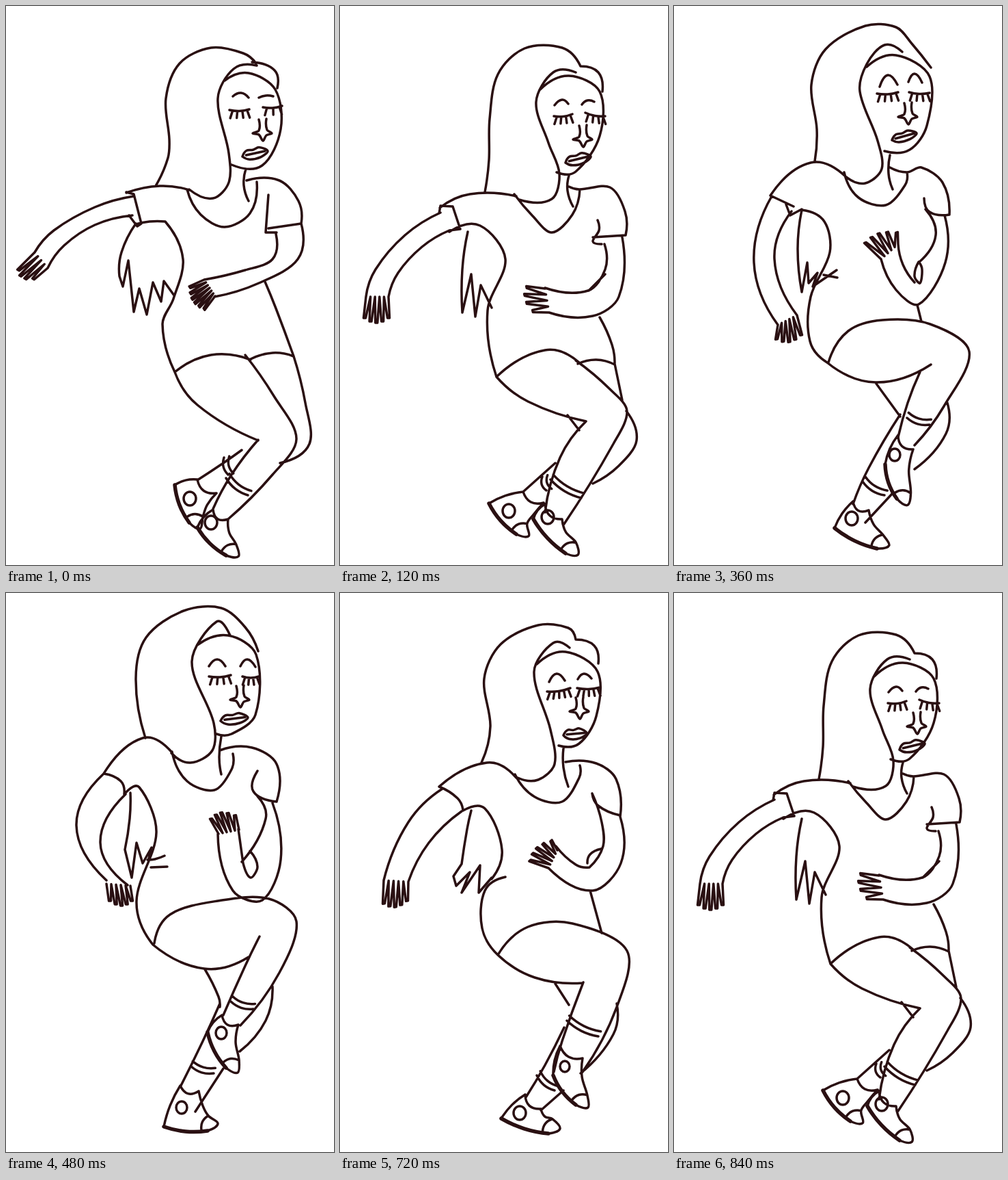
Animation, 480 px wide and 817 px high, one loop 0.96 s. Source, as an HTML page:

```html
<!DOCTYPE html>
<html lang="en">
<head>
<meta charset="utf-8">
<title>Running woman</title>
<style>
  html, body { margin: 0; width: 100%; height: 100%; overflow: hidden; background: #fff; }
  svg { display: block; width: 100%; height: 100%; }
  path { fill: none; stroke: #2a1012; stroke-linecap: round; stroke-linejoin: round; }
</style>
</head>
<body>
<svg viewBox="0 0 480 817">
  <path id="pen" stroke-width="3.5"/>
  <path id="marker" stroke-width="5.5"/>
</svg>
<script>
let ink, boldInk;

// Vector helpers
const add = (p, q, k = 1) => [p[0] + q[0] * k, p[1] + q[1] * k];
const sub = (p, q) => add(p, q, -1);
const mix = (p, q, t) => add(p, sub(q, p), t);
const unit = p => { const n = Math.hypot(...p); return [p[0] / n, p[1] / n]; };
const normal = (p, q) => { const [x, y] = unit(sub(q, p)); return [y, -x]; };
const pairs = xy => xy.reduce((all, v, i) => (i % 2 ? all[all.length - 1].push(v) : all.push([v]), all), []);

// Smooth path through all points, with tangents weighted by distance.
function spline(points) {
  const last = points.length - 1;
  const lengths = points.slice(1).map((p, i) => Math.hypot(...sub(p, points[i])));
  const slope = i => add([0, 0], sub(points[i + 1], points[i]), 1 / lengths[i]);
  const inner = i => add([0, 0], sub(points[i + 1], points[i - 1]), 1 / (lengths[i - 1] + lengths[i]));
  const tangent = i => {
    if (i > 0 && i < last) return inner(i);
    if (last === 1) return slope(0);
    return i === 0 ? sub(add(slope(0), slope(0)), inner(1))
                   : sub(add(slope(last - 1), slope(last - 1)), inner(last - 1));
  };
  let d = "M" + points[0];
  for (let i = 0; i < last; i++) {
    const k = lengths[i] / 3;
    d += `C${add(points[i], tangent(i), k)} ${add(points[i + 1], tangent(i + 1), -k)} ${points[i + 1]}`;
  }
  return d;
}

const polyline = points => "M" + points.join("L");
const curve = (...xy) => { ink += spline(pairs(xy)); };
const lines = (...xy) => { ink += polyline(pairs(xy)); };
const bow = (p, q, height) => spline([p, add(mix(p, q, 0.5), normal(p, q), height), q]);

// Closed lid with a fan of lashes below it
function eye(x0, y0, x1, y1, count) {
  const a = [x0, y0], b = [x1, y1];
  ink += bow(a, b, -2);
  for (let i = 0; i < count; i++) {
    const t = (i + 0.6) / count;
    const root = add(mix(a, b, t), [0, 2]);
    ink += polyline([root, add(root, [(t - 0.5) * 9, 10])]);
  }
}

function nose(x, y) {
  ink += spline([[x, y], [x, y + 16], [x - 9, y + 20], [x, y + 22], [x + 6, y + 31],
                 [x + 11, y + 23], [x + 19, y + 20], [x + 12, y + 15], [x + 11, y - 1]]);
}

function mouth(x0, y0, x1, y1, height) {
  const a = [x0, y0], b = [x1, y1], up = normal(a, b);
  const at = (t, k) => add(mix(a, b, t), up, k * height);
  ink += spline([a, at(0.2, 0.8), at(0.45, 0.7), at(0.7, 0.9), b, at(0.7, -0.7), at(0.25, -0.7), a]);
  ink += spline([at(0.15, 0.1), at(0.9, 0.1)]);
}

// Zigzag between a knuckle line and a rounded line of fingertips
function fingers(ax, ay, bx, by, cx, cy, dx, dy, count) {
  const a = [ax, ay], b = [bx, by], c = [cx, cy], d = [dx, dy];
  const outward = unit(sub(mix(c, d, 0.5), mix(a, b, 0.5)));
  const path = [a];
  for (let i = 0; i < count; i++) {
    const t = i / (count - 1);
    const side = add([0, 0], unit(sub(d, c)), 1.5);
    const tip = add(mix(c, d, t), outward, 7 * Math.sin(Math.PI * t));
    path.push(sub(tip, side), add(tip, side), mix(a, b, (i + 1) / count));
  }
  ink += polyline(path);
}

function sock(x0, y0, x1, y1) {
  const a = [x0, y0], b = [x1, y1], up = normal(a, b);
  ink += bow(a, b, -4) + bow(add(a, up, 8), add(b, up, 8), -4);
}

// Heel top, heel bottom, end of sole, instep, then the round badge
function shoe(hx, hy, bx, by, tx, ty, ix, iy, cx, cy, r) {
  const heel = [hx, hy], back = [bx, by], toe = [tx, ty], instep = [ix, iy];
  const along = unit(sub(toe, back)), up = normal(back, toe);
  const tip = add(add(toe, along, 14), up, 12);
  const cap = add(add(tip, along, -15), up, 10);
  ink += bow(heel, instep, -8) + bow(heel, back, -3);
  ink += spline([instep, add(mix(instep, cap, 0.45), up, -5), cap, tip, toe]);
  ink += bow(add(toe, along, -9), cap, 4);
  ink += `M${cx - r},${cy}a${r},${r + 1} 0 1 0 ${2 * r},0a${r},${r + 1} 0 1 0 ${-2 * r},0`;
  boldInk += bow(back, toe, -4);
}

function lunge() {
  // head
  curve(219,263, 237,222, 239,195, 234,135, 254,84, 300,61, 347,69, 366,84);
  curve(360,82, 393,94, 397,120);
  curve(367,87, 333,92, 310,135, 326,215, 326,258, 303,281, 268,268);
  curve(320,109, 355,98, 394,122, 402,180, 375,233, 330,232);
  curve(332,132, 344,127, 355,134);
  curve(370,134, 380,131, 391,132);
  eye(327,152, 356,151, 4);
  eye(376,148, 404,146, 3);
  nose(370,166);
  mouth(346,220, 383,212, 9);
  curve(351,238, 348,262, 355,285);
  // shirt
  curve(176,273, 225,263, 268,269);
  curve(265,268, 285,305, 320,323, 357,303, 367,257);
  curve(352,255, 400,255, 428,285, 432,318);
  lines(384,276, 380,331, 396,331);
  curve(384,325, 432,318);
  lines(176,272, 187,275, 198,318, 192,322, 180,306);
  curve(190,319, 210,315, 233,315);
  curve(233,315, 259,370, 245,428, 229,465, 247,535);
  curve(379,403, 395,442, 421,512);
  curve(247,535, 300,510, 358,517);
  curve(358,516, 390,507, 421,512);
  // hair behind the back
  curve(190,318, 169,360, 166,395);
  lines(166,395, 171,410, 179,372, 187,447, 195,413, 206,451, 215,404, 227,432, 231,402, 246,423);
  // arms
  curve(187,278, 130,294, 70,328, 42,360);
  curve(185,306, 130,320, 85,350, 61,383);
  fingers(42,360, 61,383, 18,386, 40,399, 4);
  curve(432,318, 427,370, 370,405, 305,425);
  curve(395,333, 390,370, 350,386, 290,400);
  fingers(290,400, 306,424, 269,411, 290,443, 6);
  // legs
  curve(247,535, 280,583, 369,635);
  curve(350,510, 392,570, 425,633, 390,685, 325,750);
  curve(369,634, 330,685, 303,735);
  curve(421,512, 438,580, 444,640, 401,668);
  curve(345,649, 318,668, 280,693);
  sock(322,690, 354,715);
  sock(319,660, 325,685);
  shoe(280,692, 247,700, 268,755, 308,712, 269,720, 9);
  shoe(303,736, 280,762, 322,803, 325,750, 300,755, 9);
}

function push() {
  // head
  curve(212,272, 218,225, 219,165, 231,100, 270,62, 325,61, 352,88);
  curve(352,88, 378,97, 384,125);
  curve(345,97, 312,97, 287,140, 305,200, 321,245, 310,282, 262,283);
  curve(293,122, 335,102, 380,125, 380,190, 345,242, 317,243);
  curve(314,145, 325,137, 334,143);
  curve(354,144, 362,138, 372,140);
  eye(313,161, 340,158, 4);
  eye(359,156, 388,161, 4);
  nose(350,175);
  mouth(330,229, 367,220, 9);
  curve(335,248, 333,270, 341,293);
  // shirt
  curve(146,295, 190,275, 258,278);
  curve(255,275, 282,307, 310,331, 340,305, 351,268);
  curve(335,264, 350,268, 395,265, 417,300, 418,335);
  curve(377,313, 379,328, 370,344, 383,348);
  curve(370,338, 418,335);
  lines(145,303, 147,292, 165,293, 176,326, 160,328);
  curve(160,330, 205,321, 242,370, 216,445, 229,542);
  curve(380,455, 398,495, 402,522);
  curve(229,542, 300,503, 350,521);
  curve(348,523, 375,517, 402,524);
  // hair behind the back
  curve(187,330, 179,385, 179,448);
  lines(179,448, 192,392, 198,454, 206,408, 222,441);
  // arms
  curve(147,302, 95,335, 52,385, 38,425);
  curve(160,328, 120,352, 85,390, 71,425);
  fingers(38,425, 71,425, 36,456, 71,456, 5);
  curve(413,338, 408,425, 370,453, 306,448);
  curve(387,348, 388,385, 363,416, 300,412);
  curve(388,392, 364,416);
  fingers(300,413, 306,448, 273,411, 282,446, 4);
  // legs
  curve(229,542, 275,578, 360,607);
  curve(345,518, 395,560, 420,592, 400,640, 328,757);
  curve(360,607, 322,660, 300,740);
  curve(402,523, 413,576);
  curve(419,592, 434,635, 408,672, 370,698);
  curve(333,598, 350,620);
  curve(315,668, 268,710);
  sock(308,692, 353,719);
  sock(296,688, 302,708);
  shoe(268,710, 218,727, 258,772, 298,726, 247,738, 9);
  shoe(300,728, 283,750, 330,800, 325,750, 304,747, 9);
}

function rise() {
  // head
  curve(207,248, 220,195, 211,125, 235,75, 290,47, 334,51, 345,68);
  curve(345,68, 372,77, 378,103);
  curve(336,80, 312,73, 284,115, 308,200, 314,250, 290,273, 260,270);
  curve(288,104, 330,86, 377,115, 375,180, 350,220, 320,223);
  curve(306,130, 317,118, 329,128);
  curve(348,126, 357,118, 368,125);
  eye(303,144, 337,139, 5);
  eye(347,139, 380,138, 5);
  nose(345,153);
  mouth(327,208, 361,205, 9);
  curve(327,227, 327,255, 334,283);
  // shirt
  curve(145,283, 215,248, 258,270);
  curve(256,265, 285,298, 325,305, 350,270, 351,252);
  curve(330,247, 375,249, 404,272, 410,327);
  curve(369,293, 378,311, 410,325);
  curve(369,293, 383,335, 385,370, 365,401);
  curve(145,283, 172,300, 180,317);
  curve(180,318, 212,315, 237,375, 222,418);
  curve(242,415, 212,435, 208,490, 231,529);
  curve(366,435, 383,497);
  // hair behind the back
  curve(192,318, 186,345, 178,396);
  lines(178,396, 166,414, 170,428, 190,408, 178,438, 205,398, 203,438, 222,416);
  // arms
  curve(150,286, 100,335, 64,420);
  curve(178,319, 130,365, 100,422);
  fingers(64,420, 100,422, 64,454, 98,450, 5);
  curve(410,327, 411,395, 370,435, 305,402);
  curve(316,370, 345,397, 365,401);
  curve(362,395, 366,382, 382,374);
  fingers(318,376, 305,402, 309,362, 278,391, 5);
  // legs
  curve(231,529, 275,488, 340,483, 420,523, 405,605, 355,700);
  curve(231,529, 285,562, 355,570);
  curve(356,569, 325,655, 313,700);
  curve(315,571, 335,602);
  curve(405,600, 400,645, 352,702);
  curve(328,635, 300,690, 272,737);
  curve(327,727, 294,756);
  sock(332,625, 378,648);
  sock(288,705, 314,727);
  shoe(322,662, 312,705, 345,748, 355,680, 329,692, 7);
  shoe(271,733, 236,768, 305,790, 294,754, 263,760, 9);
}

function lift() {
  // head
  curve(206,227, 209,180, 201,115, 222,63, 280,29, 325,31, 348,55, 376,90);
  curve(334,67, 308,57, 282,85, 272,125, 298,197, 304,238, 280,259, 252,250);
  curve(282,89, 325,72, 374,103, 370,175, 345,210, 308,212);
  curve(301,118, 313,101, 327,115);
  curve(343,111, 352,99, 363,112);
  eye(297,128, 328,126, 4);
  eye(344,126, 374,127, 4);
  nose(337,142);
  mouth(319,196, 355,186, 8);
  curve(316,218, 314,245, 320,268);
  // shirt
  curve(141,277, 200,229, 252,250);
  curve(249,243, 270,280, 310,291, 338,262, 341,243);
  curve(316,236, 341,243, 362,236, 393,258, 403,305);
  curve(366,281, 374,301, 403,305);
  curve(368,297, 383,335, 358,375);
  curve(141,277, 175,293);
  lines(164,290, 170,306, 187,297);
  curve(187,298, 220,315, 228,360, 200,425, 199,490, 224,521);
  curve(356,437, 362,461);
  // hair behind the back
  curve(187,298, 181,355, 187,418);
  lines(187,418, 195,375, 197,405, 210,390, 203,410, 238,386);
  curve(219,393, 239,397);
  // arms
  curve(143,278, 117,375, 152,466);
  curve(172,300, 147,370, 180,452);
  fingers(152,466, 180,452, 150,487, 186,481, 5);
  curve(396,306, 397,375, 358,436, 325,415, 303,370);
  curve(328,348, 335,378, 352,404);
  curve(358,374, 352,395, 360,405, 363,385, 358,374);
  fingers(303,370, 328,348, 280,346, 326,331, 5);
  // legs
  curve(226,521, 255,475, 305,459, 375,465, 432,505, 395,585, 352,642);
  curve(224,521, 295,550, 376,524);
  curve(360,535, 342,580, 328,630);
  curve(296,552, 331,600);
  curve(400,580, 398,625, 352,677);
  curve(331,597, 285,675, 262,728);
  curve(320,712, 280,755);
  sock(341,602, 374,612);
  sock(276,695, 308,715);
  shoe(328,627, 309,670, 326,720, 350,648, 323,656, 8);
  shoe(262,724, 235,763, 297,793, 285,737, 260,749, 9);
}

function peak() {
  // head
  curve(204,212, 190,125, 205,65, 260,26, 315,22, 350,50, 369,85);
  curve(328,62, 308,42, 272,100, 304,190, 302,230, 270,248, 242,234);
  curve(280,76, 325,62, 366,90, 365,178, 330,206, 308,206);
  curve(297,107, 309,97, 321,107);
  curve(343,107, 353,97, 365,108);
  eye(297,122, 329,120, 4);
  eye(346,122, 370,122, 4);
  nose(337,136);
  mouth(314,187, 354,182, 9);
  curve(315,210, 312,240, 315,265);
  // shirt
  curve(143,264, 200,212, 243,233);
  curve(243,232, 265,275, 305,288, 330,258, 332,235);
  curve(313,230, 360,226, 396,250, 396,305);
  curve(368,260, 362,290, 396,305);
  curve(368,297, 380,330, 345,393);
  curve(143,264, 168,275, 173,294);
  curve(173,294, 195,284, 220,350, 191,450, 215,514);
  curve(207,390, 218,389, 232,384);
  curve(212,401, 236,400);
  // hair behind the back
  curve(182,292, 181,330, 174,375);
  lines(174,375, 184,416, 191,365, 200,395, 213,372, 209,388);
  // arms
  curve(143,264, 103,340, 147,420);
  curve(175,294, 138,365, 178,427);
  fingers(147,425, 182,428, 152,450, 184,450, 5);
  curve(390,307, 402,390, 375,449, 332,435, 310,352);
  curve(340,345, 347,395);
  curve(347,395, 358,416, 368,400, 357,377);
  fingers(311,352, 341,346, 300,330, 335,325, 5);
  // legs
  curve(217,512, 240,470, 310,450, 385,447, 425,480, 400,555, 343,632);
  curve(215,514, 290,549, 355,532);
  curve(371,502, 350,545, 318,617);
  curve(291,550, 311,590, 313,605);
  curve(390,575, 380,625, 342,670);
  curve(313,600, 288,655, 255,722);
  curve(318,695, 277,758);
  sock(329,597, 362,608);
  sock(271,692, 304,702);
  shoe(316,617, 295,642, 322,694, 340,631, 315,643, 8);
  shoe(255,720, 231,780, 295,786, 282,728, 257,752, 8);
}

const sequence = [lunge, push, rise, lift, peak, lift, rise, push];
const stepTime = 120;
const pen = document.getElementById("pen");
const marker = document.getElementById("marker");
const start = performance.now();
let shown;

function render(now) {
  const step = Math.floor(Math.max(0, now - start) / stepTime) % sequence.length;
  const pose = sequence[step];
  if (pose !== shown) {
    ink = boldInk = "";
    pose();
    pen.setAttribute("d", ink);
    marker.setAttribute("d", boldInk);
    shown = pose;
  }
  requestAnimationFrame(render);
}
render(start);
</script>
</body>
</html>
```
